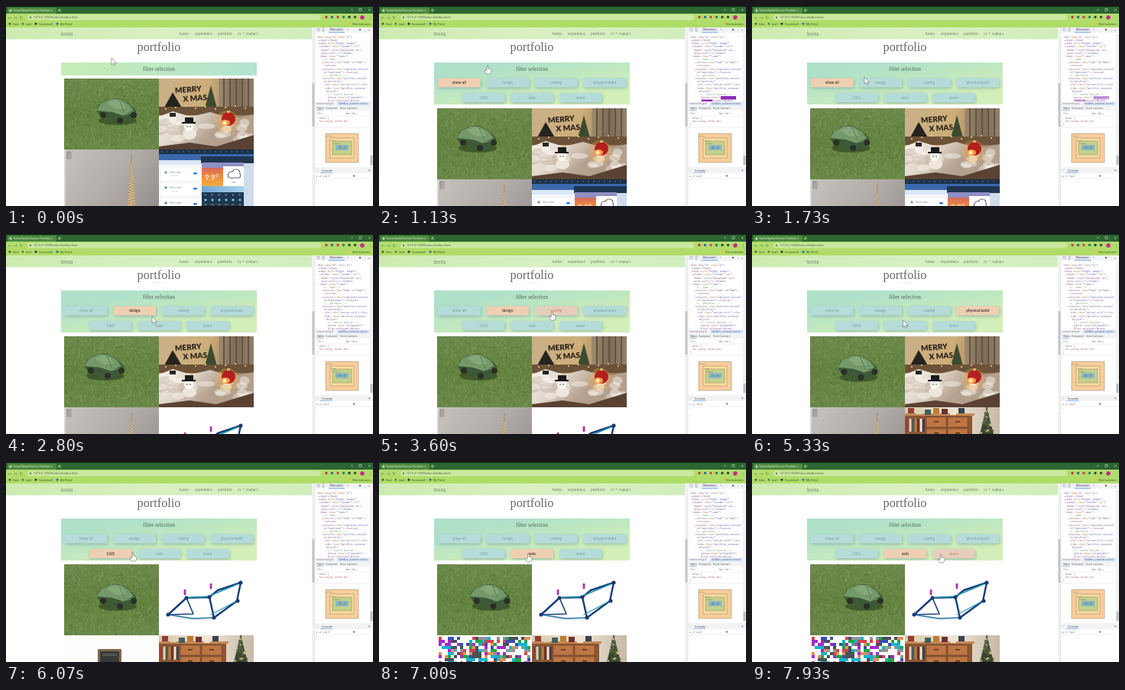
These frames come from a looping animation (480 px wide and 262 px high, 8000 ms). An HTML page with a canvas:

```html
<!DOCTYPE html>
<html lang="en">
<head>
<meta charset="utf-8">
<title>Portfolio filter</title>
<style>
html, body { margin: 0; width: 100%; height: 100%; overflow: hidden; }
canvas { display: block; width: 480px; height: 262px; }
</style>
</head>
<body>
<canvas id="stage"></canvas>
<script>
const SERIF = '"Liberation Serif", serif', SANS = 'Lato, sans-serif';
const MONO = '"Liberation Mono", monospace', UI = 'Roboto, sans-serif';
const LOOP = 8000, dpr = window.devicePixelRatio || 1;
const stage = document.getElementById('stage');
let c;

function sized(canvas, w, h) {
  canvas.width = w * dpr;
  canvas.height = h * dpr;
  const context = canvas.getContext('2d');
  context.scale(dpr, dpr);
  return context;
}
const rect = (x, y, w, h, color) => { c.fillStyle = color; c.fillRect(x, y, w, h); };
function box(x, y, w, h, color) {
  c.strokeStyle = color;
  c.lineWidth = .5;
  c.strokeRect(x, y, w, h);
}
function round(x, y, w, h, r, color) {
  c.fillStyle = color;
  c.beginPath();
  c.roundRect(x, y, w, h, r);
  c.fill();
}
function oval(x, y, rx, ry, color) {
  c.fillStyle = color;
  c.beginPath();
  c.ellipse(x, y, rx, ry, 0, 0, 7);
  c.fill();
}
const dot = (x, y, r, color) => oval(x, y, r, r, color);
function trace(points) {
  c.beginPath();
  for (let i = 0; i < points.length; i += 2) c.lineTo(points[i], points[i + 1]);
}
function poly(points, color) { trace(points); c.fillStyle = color; c.fill(); }
function line(points, color, width = .6) {
  trace(points);
  c.strokeStyle = color;
  c.lineWidth = width;
  c.stroke();
}
function text(s, x, y, size, color, family = UI, align = 'left', weight = 400) {
  c.font = `${weight} ${size}px ${family}`;
  c.textAlign = align;
  c.fillStyle = color;
  c.fillText(s, x, y);
}
function gradient(x0, y0, x1, y1, ...colors) {
  const g = c.createLinearGradient(x0, y0, x1, y1);
  colors.forEach((color, i) => g.addColorStop(i / (colors.length - 1), color));
  return g;
}
function clipped(x, y, w, h, draw) {
  c.save();
  c.beginPath();
  c.rect(x, y, w, h);
  c.clip();
  draw();
  c.restore();
}
function seeded(seed) {
  return () => (seed = (seed * 16807) % 2147483647) / 2147483647;
}
const clamp = v => Math.min(1, Math.max(0, v));
const smooth = v => (v = clamp(v)) * v * (3 - 2 * v);

// Eased interpolation through [time, ...values] rows
function follow(keys, t) {
  const i = Math.max(1, keys.findIndex(k => k[0] > t));
  const a = keys[i - 1], b = keys[i];
  const k = smooth((t - a[0]) / (b[0] - a[0]));
  return a.slice(1).map((v, n) => v + (b[n + 1] - v) * k);
}

// Pictures, each 124 x 93
const CARD_W = 124, CARD_H = 93;
const scenes = {
  car() {
    rect(0, 0, 124, 93, gradient(0, 0, 0, 93, '#6d8a4c', '#64823f', '#6b8a49'));
    const rnd = seeded(71), tones = ['#4a6831', '#87a163', '#5f7c40', '#a3b581', '#425d2c'];
    c.globalAlpha = .5;
    for (let i = 0; i < 1300; i++) {
      const x = rnd() * 124, y = rnd() * 93;
      line([x, y, x + rnd() * 5 - 2.5, y - 1 - rnd() * 3], tones[i % 5], .8);
    }
  },
  snowman() {
    rect(0, 0, 124, 93, gradient(0, 0, 124, 30, '#c9b08a', '#cdae79', '#8b7152'));
    rect(78, 0, 46, 42, gradient(78, 0, 124, 0, '#a08b70', '#7d6a55', '#94806a'));
    for (let x = 84; x < 124; x += 8) rect(x, 0, 2, 42, '#64533f');
    poly([6, 40, 18, 18, 31, 40], '#25231d');
    poly([60, 39, 68, 9, 76, 39], '#3b4a30');
    rect(0, 37, 124, 11, '#6b5238');
    for (let x = 9; x < 120; x += 13) dot(x, 36 + x % 5, 1, '#ffd98a');
    c.save();
    c.rotate(-.08);
    text('MERRY', 37, 21, 10, '#2b2117', SANS, 'center', 900);
    text('X MAS', 45, 33, 10, '#2b2117', SANS, 'center', 900);
    c.restore();
    poly([0, 50, 18, 43, 42, 50, 67, 44, 95, 52, 124, 47, 124, 93, 0, 93],
      gradient(0, 45, 50, 93, '#f6f0e8', '#e2d8cc', '#b39f8c'));
    const rnd = seeded(19);
    for (let i = 0; i < 26; i++)
      oval(rnd() * 120, 57 + rnd() * 24, 5 + rnd() * 8, 3 + rnd() * 4, i % 3 ? '#fbf6ef77' : '#b9a89a55');
    poly([0, 89, 40, 84, 75, 89, 124, 74, 124, 93, 0, 93], '#5a4233');
    dot(18, 54, 5, '#f1eee8');
    rect(14, 45, 8, 5, '#292522');
    oval(40, 73, 9, 7, '#efe7dc');
    dot(39, 63, 6, '#fffaf2');
    rect(34, 51, 11, 7, '#191a1c');
    rect(30, 57, 18, 2, '#191a1c');
    dot(37, 63, .8, '#222');
    dot(41, 63, .8, '#222');
    dot(89, 57, 15, '#ffb34744');
    dot(91, 53, 9, '#b3201d');
    oval(87, 58, 6, 4, '#ff9a4a');
    dot(86, 58, 2.5, '#fff0b5');
    rect(89, 42, 4, 3, '#d8b25c');
  },
  tower() {
    rect(0, 0, 124, 93, gradient(0, 0, 124, 93, '#c6c2be', '#b1aca8', '#8f8a88'));
    rect(0, 0, 2, 93, '#d8d6d2');
    box(4, 3, 5, 9, '#666');
    for (let y = 4; y < 12; y += 2) line([4, y, 8, y], '#555', .5);
    const x = 88;
    poly([x, 11, x - 7, 93, x + 7, 93], '#c6ad82');
    for (let y = 14; y < 93; y += 3.5) {
      const w = y / 13;
      line([x - w, y, x + w, y + 3], '#8c7048', .7);
      line([x + w, y, x - w, y + 3], '#e8d4a7', .7);
    }
    line([x, 7, x, 18], '#a68a5c', 1);
  },
  dashboard() {
    rect(0, 0, 124, 93, '#f6f8fa');
    rect(0, 0, 124, 6, '#1c3146');
    for (let x = 4; x < 122; x += 7) dot(x, 3, .8, x % 3 ? '#6c8799' : '#4fa3c4');
    rect(0, 6, 124, 8, '#3c68ae');
    rect(0, 14, 56, 6, '#dbe7f6');
    rect(55, 9, 69, 9, '#20354f');
    for (let y = 24; y < 93; y += 20) {
      rect(2, y, 52, 17, '#fff');
      box(2, y, 52, 17, '#e1e6ea');
      dot(9, y + 6, 1.7, y > 40 ? '#42a56a' : '#8999a6');
      text('Device status', 14, y + 7, 2.6, '#7c868e');
      text('Last update', 14, y + 11, 2.2, '#a8afb5');
      round(45, y + 6, 5, 2.5, 1.2, '#337bda');
    }
    rect(56, 17, 55, 8, '#8f8fc4');
    rect(56, 24, 28, 24, gradient(0, 24, 0, 48, '#d9695b', '#ee8f3c', '#f3ab45'));
    text('9.9°', 69, 40, 10, '#fff', SANS, 'center');
    rect(84, 22, 27, 26, '#fff');
    dot(95, 33, 4.6, '#333'); dot(101, 31, 5.5, '#333');
    round(90, 31, 17, 6.6, 3.3, '#333');
    dot(95, 33, 3.8, '#fff'); dot(101, 31, 4.7, '#fff');
    round(90.8, 31.8, 15.4, 5, 2.5, '#fff');
    text('rain', 98, 44, 3, '#777', SANS, 'center');
    rect(56, 48, 55, 8, gradient(56, 0, 111, 0, '#6ea6d6', '#a9d3ec'));
    rect(56, 56, 55, 20, '#1d3850');
    for (let x = 61; x < 110; x += 9) {
      text('9°', x, 61, 3, '#c7e3ea', SANS, 'center');
      dot(x, 66, 1.6, '#8fc4d0');
      line([x - 2, 72, x + 2, 72], '#c99a62', .8);
    }
    rect(111, 18, 13, 75, '#cfdcec');
  },
  bike() {
    rect(0, 0, 124, 93, '#fff');
    poly([12, 71, 45, 69, 72, 74, 45, 73], '#e9edf0');
    c.lineJoin = c.lineCap = 'round';
    line([12, 66, 36, 44, 66, 43, 77, 34, 107, 24, 102, 48, 72, 70, 66, 43], '#173d79', 2.4);
    line([12, 66, 45, 65, 36, 44], '#173d79', 1.6);
    line([12, 66, 44, 71, 72, 70], '#2875a5', 1.5);
    line([36, 44, 65, 42, 103, 26], '#2498ae', 1.4);
    line([68, 66, 102, 48], '#2498ae', 1.2);
    [[12, 66], [36, 44], [66, 43], [107, 24], [103, 48], [72, 70]].forEach(([x, y]) => dot(x, y, 2.5, '#183a75'));
    [[34, 36], [68, 28]].forEach(([x, y]) => {
      line([x, y - 3, x, y + 4], '#a52a9c', 1.2);
      poly([x - 2, y + 1, x + 2, y + 1, x, y + 5], '#a52a9c');
      dot(x, y - 1, 1.7, '#b12aa6');
    });
  },
  puzzle() {
    rect(0, 0, 124, 93, '#fff');
    const rnd = seeded(313), tones = ['#a52acb', '#d8404e', '#16b5cf', '#25a34a', '#3a4fb0', '#e0935a', '#8d969b', '#4a4f58'];
    for (let y = 2; y < 93; y += 4) {
      let color = tones[0];
      for (let x = 2; x < 122; x += 4) {
        if (rnd() < .5) color = tones[Math.floor(rnd() * tones.length)];
        if (rnd() < .6) rect(x, y, 4, 4, color);
      }
    }
  },
  code() {
    rect(0, 0, 124, 93, '#23251f');
    const rows = ['# main loop', '', '# Read the next items and update the result', '# A small example of clear control flow',
      'def update_board(board):', '    for cell in board:', '        value = 1', '        count = 4',
      '        if value:', '            return count', '    return board'];
    rows.forEach((s, i) => text(s, 7, 8 + i * 4.3, 2.8, s[0] === '#' ? '#7d8a64' : i % 3 ? '#b5b096' : '#b9668a', MONO));
  },
  page() {
    rect(0, 0, 124, 93, '#eceef3');
    rect(0, 0, 124, 5, '#24405e');
    for (let x = 3; x < 122; x += 6) dot(x, 2.5, .8, '#7fa0bd');
    rect(0, 5, 124, 5, '#a9bed6');
    rect(25, 15, 32, 78, '#fff');
    box(25, 15, 32, 78, '#cfa7ad');
    rect(29, 20, 22, 10, '#e3c3c2');
    for (let y = 15; y < 93; y += 4) {
      line([4, y, 10 + y % 11, y], '#aab2bd');
      line([63, y, 80 + y % 19, y], '#b9bec8');
    }
    rect(90, 12, 30, 81, '#fafafa');
    box(90, 12, 30, 81, '#c9ced6');
  },
  board() {
    rect(0, 0, 124, 93, '#fdfdfc');
    round(44, 18, 31, 60, 1, '#80664e');
    rect(47, 21, 25, 54, '#373a39');
    rect(50, 24, 19, 3, '#515855');
  },
  shelf() {
    rect(0, 0, 124, 93, gradient(0, 0, 124, 0, '#d9c9b0', '#eee6d9', '#c8b9a6'));
    rect(0, 9, 88, 84, '#8b5634');
    rect(0, 8, 91, 3, '#c68a59');
    for (let y = 13; y < 90; y += 15) for (let x = 28; x < 80; x += 28) {
      rect(x, y, 26, 13, '#bd7643');
      box(x, y, 26, 13, '#653a26');
      rect(x + 10, y + 5, 6, 1.5, '#4d3021');
    }
    ['#963d32', '#ddd1b6', '#455d57', '#bd7c36', '#6f3030', '#eee2cd', '#394150'].forEach((color, i) => {
      rect(2 + i * 3.5, 15, 3, 17, color);
      rect(4 + i * 11, 1 + i % 3, 8, 7, color);
    });
    poly([107, 0, 92, 58, 122, 58], '#38472f');
    const rnd = seeded(51);
    for (let i = 0; i < 65; i++) {
      const y = rnd() * 56;
      dot(107 + (rnd() - .5) * y * .55, y, 1.2, i % 5 ? '#5b6648' : '#dfbe70');
    }
    rect(105, 58, 5, 18, '#59402c');
  }
};
const pictures = {};
for (const name in scenes) {
  const sheet = document.createElement('canvas');
  c = sized(sheet, CARD_W, CARD_H);
  scenes[name]();
  pictures[name] = sheet;
}
c = sized(stage, 480, 262);

const filters = [
  [0, 'show all', 'car snowman tower dashboard'],
  [2250, 'design', 'car snowman tower bike'],
  [3800, 'coding', 'dashboard puzzle code page'],
  [4860, 'physical build', 'car snowman tower shelf'],
  [5720, 'CAD', 'car bike board shelf'],
  [7000, 'solo', 'car bike puzzle shelf'],
  [LOOP, 'team', '']
];
const buttonAt = i => i < 4 ? [77 + i * 63.5, 94.5] : [109 + (i - 4) * 63.5, 114];
const BUTTON_W = 55.5, BUTTON_H = 12, OPEN_AT = 870;
const pointerPath = [
  [0, 138, 68], [650, 142, 78], [1300, 142, 78], [1730, 147, 93], [2100, 166, 101], [2380, 168, 102],
  [2800, 191, 108], [3550, 226, 102], [3950, 230, 102], [4670, 277, 100], [4950, 281, 101],
  [5600, 148, 120], [5780, 150, 120], [6070, 166, 119], [6700, 193, 120], [7150, 196, 120],
  [7930, 247, 121], [LOOP, 250, 121]
];
const carPath = [[0, 0, 0], [150, 0, 0], [1130, -17, -3], [2800, -16, -3], [4860, -16, -3], [5700, 0, 0], [LOOP, 1, 0]];

function drawCar(t) {
  const [dx, dy] = follow(carPath, t);
  c.save();
  c.translate(dx, dy);
  oval(70, 55, 25, 6, '#2f4522aa');
  poly([43, 43, 46, 34, 58, 27, 72, 26, 85, 33, 94, 42, 93, 51, 77, 59, 65, 56, 47, 49], '#3d5a38');
  poly([43, 42, 48, 33, 60, 27, 73, 27, 85, 34, 91, 42, 77, 48, 64, 44], '#73996a');
  poly([56, 32, 67, 27, 77, 31, 81, 39, 68, 40], '#86a879');
  line([64, 43, 77, 48, 92, 44], '#92ac80', .8);
  line([72, 28, 79, 45], '#54784f', .9);
  [[51, 48], [73, 55], [91, 48]].forEach(([x, y]) => oval(x, y, 4, 4, '#2b2f25'));
  c.restore();
}

function drawBrowser() {
  rect(0, 0, 480, 10, '#2d6533');
  rect(0, 0, 480, 1, '#0c1c0e');
  round(2, 2, 64, 8, 2, '#4f8a40');
  dot(6, 6, 1.4, '#cfe5c0');
  text('Tovina Raskel Domm | Portfolio', 9, 7, 3.5, '#e6f2dc');
  text('×', 59, 7.2, 4, '#e6f2dc');
  dot(70, 5.7, 2.5, '#4f8a40');
  text('+', 70, 7.3, 5, '#dcebd0', UI, 'center');
  line([451, 5, 454, 5], '#d5e6ca');
  box(462, 3.5, 3, 3, '#d5e6ca');
  text('×', 474, 7, 5, '#d5e6ca');
  rect(0, 10, 480, 18, gradient(0, 10, 0, 28, '#b4dd72', '#aedb63'));
  text('←  →  ↻', 3, 17, 5, '#4a6a2e', 'DejaVu Sans, sans-serif');
  round(28, 11.5, 384, 7, 3.5, '#cbe8a2');
  dot(32, 15, 1.2, '#5c7c46');
  text('127.0.0.1:5500/index.html#portfolio', 36, 16.3, 3.6, '#4b6337');
  ['#c53a3a', '#35649c', '#d94040', '#2b7c55', '#27492b', '#3b4a2b'].forEach((color, i) => dot(419 + i * 7.5, 14.5, 1.7, color));
  dot(466, 15, 2.8, '#c22d87');
  text('⋮', 474, 17, 5, '#3c5a28');
  [[4, 'Save', '#496b2e'], [21, 'draft', '#5a8a35'], [38, 'Coursewall', '#333'], [66, 'My Portal', '#2f6bab']].forEach(([x, s, color]) => {
    dot(x + 1, 23.2, 1.5, color);
    text(s, x + 5, 24.5, 3.6, '#3c5a28');
  });
  rect(449, 21.5, 3, 3, '#e7c655');
  text('Other bookmarks', 453, 24.5, 3.1, '#3c5a28');
}

const domRows = `<html lang="en" class="js">
 ▸<head>…</head>
 ▾<body style="height: 2000px">
  ▸<header class="l-header" id="l-
   header" style="background: var(--
   green-color);">…</header>
  ▾<main class="l-main">
     <!-- home -->
    ▸<section class="home" id="home">…
     </section>
    ▸<section class="experience section"
     id="experience">…</section>
     <!-- portfolio -->
    ▾<section class="portfolio section"
     id="portfolio">
      ▸<h2 class="section-title">…</h2>
      ▾<div class="portfolio_container
       bd-grid">
        <!-- control buttons -->
        <button class="collapsible">
        filter selection</button>`.split('\n');

function drawCode(row, y) {
  let x = 407 + row.search(/\S/) * 1.68;
  for (const part of row.trim().split(/(<!--.*-->|"[^"]*"?|[\w-]+=)/)) {
    const color = part.startsWith('<!--') ? '#6c946e' : part[0] === '"' ? '#5f5fa8' : part.endsWith('=') ? '#a8774a' : '#8c5a8a';
    text(part, x, y, 2.8, color, MONO);
    x += part.length * 1.68;
  }
}

function drawTools(t) {
  rect(400, 28, 80, 234, '#fff');
  rect(400, 28, 80, 7, '#f1f3f4');
  box(407, 29.5, 3, 3, '#888');
  box(414, 29, 2, 4, '#888');
  rect(422, 28, 21, 6.5, '#e3e9f2');
  text('Elements', 424, 32.3, 4, '#444');
  rect(422, 34.2, 21, .8, '#6aa0e8');
  text('»', 446, 32.3, 4, '#666');
  dot(463, 31, 1.3, '#6b7075');
  text('⋮  ×', 468, 32.5, 4, '#666');
  clipped(404, 36, 72, 89.5, () => {
    const glow = t < 900 ? 0 : t < 1250 ? 1 : Math.max(0, 1 - (t - 1250) / 850);
    const color = `rgba(151,35,183,${glow})`;
    rect(447, 118, 20, 4.5, color);
    rect(422, 122.5, 14, 3, color);
    domRows.forEach((row, i) => drawCode(row, 42 + i * 4.16));
  });
  rect(400, 125, 80, 6, '#f4f5f6');
  rect(433, 125.5, 43, 5, '#d9e8fa');
  text('ontainer.bd-grid', 406, 129.2, 3.2, '#8e6f96');
  text('div#filter_container.content', 435, 129.2, 3.1, '#6d6284');
  rect(400, 131, 80, 6, '#f1f3f4');
  text('Styles', 407, 135.3, 3.3, '#444');
  text('Computed', 418, 135.3, 3.3, '#666');
  text('Event Listeners', 437, 135.3, 3.3, '#666');
  rect(406, 136.5, 9, .7, '#6aa0e8');
  text('Filter', 407, 142, 3.2, '#999');
  text(':hov  .cls  +', 444, 142, 3.2, '#666');
  line([404, 144, 476, 144], '#ddd', .5);
  text('::after {', 407, 148, 2.8, '#666', MONO);
  text('box-sizing: border-box;', 410, 152, 2.8, '#a86464', MONO);
  text('}', 407, 156, 2.8, '#666', MONO);
  line([404, 159, 476, 159], '#ddd', .5);
  [[418, 167, 43, 38, '#f9cc9d', 'margin'], [424, 173, 31, 26, '#fddd9b', 'border'], [427, 177, 25, 18, '#c3d08b', 'padding']].forEach(([x, y, w, h, color, label]) => {
    rect(x, y, w, h, color);
    box(x, y, w, h, '#8d8068');
    text(label, x + 1, y + 3.5, 2.5, '#666');
  });
  rect(431, 182, 17, 7, '#8cb6c0');
  text('256 × 38', 439.5, 186.7, 2.8, '#456a75', UI, 'center');
  rect(476, 36, 4, 174, '#f2f2f2');
  rect(476.5, 196, 3, 12, '#b9bdc0');
  rect(400, 211, 80, 8, '#f1f3f4');
  text('⋮', 405, 216.5, 4, '#666');
  text('Console', 413, 216.5, 3.8, '#444');
  rect(411, 218.3, 16, .7, '#6aa0e8');
  text('×', 474, 217, 5, '#666');
  text('▸  ⊘  top ▾', 406, 224, 3.3, '#777', 'DejaVu Sans, sans-serif');
  dot(455, 222.5, 1.3, '#888');
  line([404, 226, 480, 226], '#ddd', .5);
  text('›', 406, 230, 4, '#3476d0');
  // Page scroll bar
  rect(400, 28, 4, 234, '#f1f1f1');
  rect(400.5, 101, 3, 57, '#c3c5c6');
  line([404, 28, 404, 262], '#d5d8da', .5);
}

function drawButton(label, i, active, hover) {
  const [x, y] = buttonAt(i);
  c.save();
  c.shadowColor = '#5f8a9a80';
  c.shadowBlur = 4 * dpr;
  c.shadowOffsetX = dpr;
  c.shadowOffsetY = 1.5 * dpr;
  round(x, y, BUTTON_W, BUTTON_H, 1.5, active ? '#efcfb2' : hover ? '#e6cfba' : '#b5dcd9');
  c.restore();
  text(label, x + BUTTON_W / 2, y + 7.7, 5, active ? '#4a403a' : hover ? '#cc7a6e' : '#7c9da1', SANS, 'center', active ? 700 : 400);
}

function drawPage(t, px, py) {
  rect(0, 28, 400, 234, '#fff');
  rect(0, 28, 400, 15.5, gradient(0, 28, 400, 44, '#cdebb0', '#d8f0c2', '#d2eebd'));
  text('tovra', 72, 38.5, 7.4, '#6a7d68', SERIF);
  [[227, 'home'], [247, 'experience'], [277, 'portfolio'], [303, 'cv + contact']].forEach(([x, s]) => text(s, x, 38, 5.3, '#6b8269', SERIF));
  text('portfolio', 200, 59, 16.3, '#66696b', SERIF, 'center');
  rect(192, 63.5, 16, .8, '#e4e1f4');

  const open = smooth((t - OPEN_AT) / 230), panelH = 17 + 38 * open;
  const active = filters.findLastIndex(f => t >= f[0]);
  rect(72, 74, 256, panelH, open
    ? gradient(190, 74, 200, 74 + panelH, '#afe1c9', '#c0e8c0', '#d3efb9')
    : gradient(72, 74, 328, 91, '#c8edb6', '#bce8c3', '#b2e3d0'));
  text('filter selection', 200, 85, 7.3, '#53675c', SERIF, 'center');
  let hand = py > 74 && py < 91 && px > 72 && px < 328;
  clipped(72, 74, 256, panelH, () => filters.forEach(([, label], i) => {
    const [x, y] = buttonAt(i);
    const inRow = open && py > y && py < y + BUTTON_H;
    const hover = inRow && px > x && px < x + BUTTON_W;
    if (inRow && px > x - 2 && px < x + BUTTON_W + 2) hand = true;
    drawButton(label, i, i === active, hover);
  }));

  filters[active][2].split(' ').forEach((name, i) => {
    c.save();
    c.translate(76 + i % 2 * CARD_W, 95 + 39 * open + (i >> 1) * CARD_H);
    c.drawImage(pictures[name], 0, 0, CARD_W, CARD_H);
    if (name === 'car') drawCar(t);
    c.restore();
  });
  return hand;
}

function drawPointer(x, y, hand) {
  c.save();
  c.translate(x, y);
  trace(hand
    ? [-.8, 0, .8, 0, 1, 4, 4, 4.5, 5, 6, 4.5, 9, 3, 11, -1, 11, -4, 7, -3, 6, -1, 7]
    : [0, 0, 0, 9, 2, 7.3, 3.5, 10.5, 5, 9.8, 3.6, 6.7, 6.3, 6.5]);
  c.closePath();
  c.fillStyle = '#fff';
  c.fill();
  c.strokeStyle = '#666';
  c.lineWidth = .6;
  c.stroke();
  c.restore();
}

const start = performance.now();
function frame() {
  const t = (performance.now() - start) % LOOP;
  const [x, y] = follow(pointerPath, t);
  const hand = drawPage(t, x, y);
  drawBrowser();
  drawTools(t);
  drawPointer(x, y, hand);
  requestAnimationFrame(frame);
}
frame();
</script>
</body>
</html>
```
